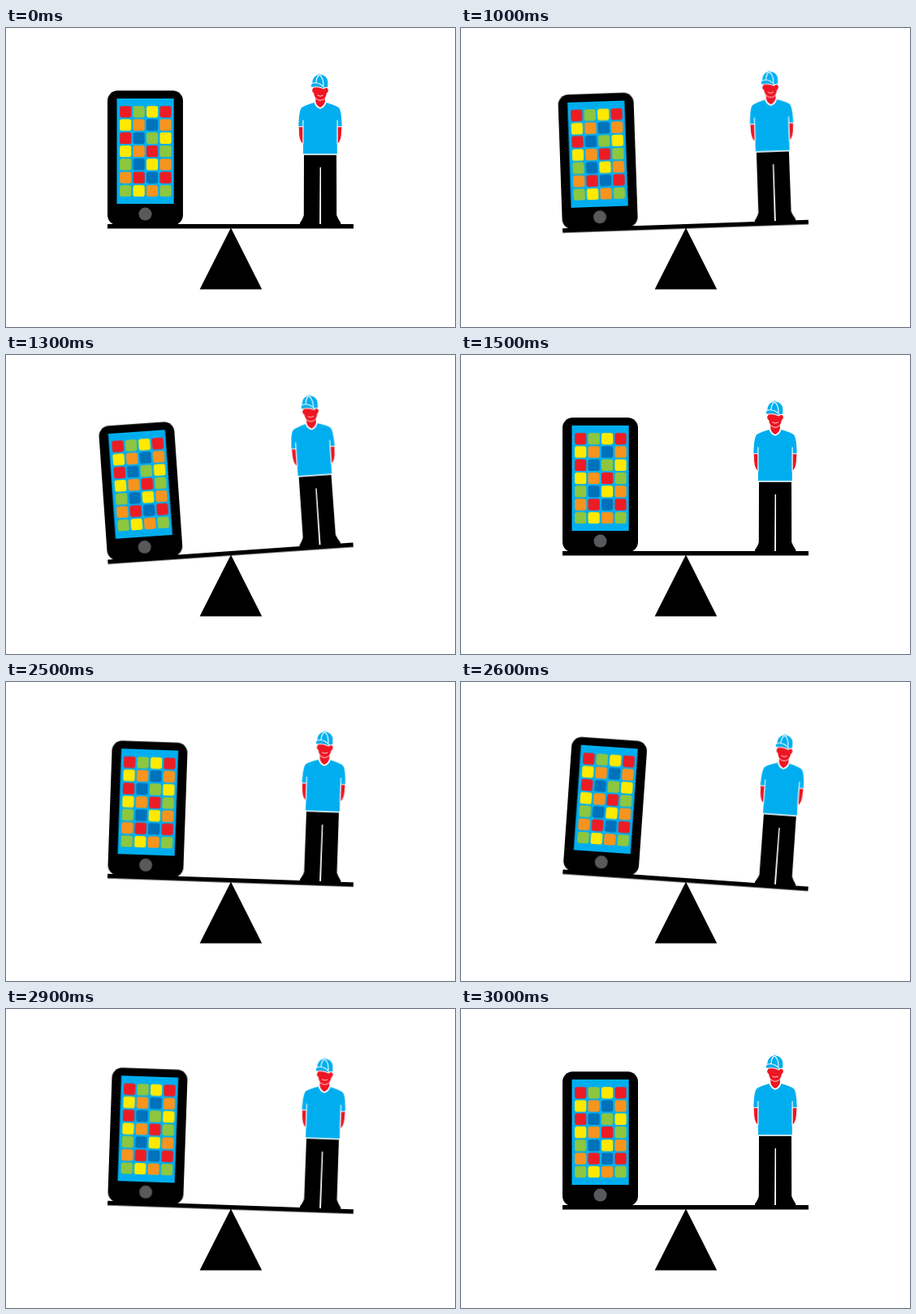
Animation, 553 px wide and 369 px high, one loop 3100 ms. Source, as an HTML page:

```html
<!DOCTYPE html>
<html lang="en">
<head>
<meta charset="utf-8">
<title>Balance</title>
<style>
  html, body { margin: 0; width: 100%; height: 100%; overflow: hidden; background: #fff; }
  svg { display: block; width: 100vw; height: 100vh; }
  #seesaw { transform-origin: 277px 244.3px; }
  .skin { fill: #ed1622; }
  .cloth { fill: #00aeef; }
  .seam { fill: none; stroke: #fff; stroke-width: 1.1; stroke-linecap: round; stroke-linejoin: round; }
  .bold { stroke-width: 1.7; }
  .fine { stroke-width: .8; }
</style>
</head>
<body>
<svg viewBox="0 0 553 369">
  <path d="M277 246.5L315.2 322.5H238.6Z"/>
  <g id="seesaw">
    <rect x="125" y="242" width="303" height="5.5"/>

    <g id="phone">
      <rect x="125" y="77.3" width="93" height="166" rx="12.5"/>
      <rect class="cloth" x="136.5" y="87" width="70.2" height="130"/>
      <circle cx="171.5" cy="229.6" r="8" fill="#58595b"/>
      <g id="tiles"></g>
    </g>

    <g id="man">
      <path d="M367 156H407L407.2 231Q408.5 235 412.3 240.5V243H388V172H386.6L386.1 243H362V240.5Q366 235 366.8 231Z"/>
      <path class="skin" d="M360.6 121H365.8V143Q362 140 361.2 132Z"/>
      <path class="skin" d="M413.4 121H408.2V143Q412 140 412.8 132Z"/>
      <path class="cloth" d="M380 92Q367 95.5 364 98.5Q360.8 102 360.3 122H366V156.2H407.8V122H413.7Q413.2 102 410 98.5Q407 95.5 394 92L387 99Z"/>
      <path class="skin" d="M381.3 84H392.9V92Q391 97 387 98.2Q383 97 381.3 92Z"/>
      <path class="seam bold" d="M380.2 91Q381.5 97 387 99Q392.5 97 393.9 91"/>
      <path class="skin" d="M378.4 69H395.6L395.8 75Q397.4 75.2 396.8 77.5Q396.2 80 395 80Q394 88 387 89.2Q380 88 379 80Q377.8 80 377.2 77.5Q376.6 75.2 378.2 75Z"/>
      <path class="seam fine" d="M383.8 83.2Q387 85.4 390.4 83.2M381.8 87.2Q387 91.8 392.4 87.2"/>
      <path class="seam" d="M365.9 114V143M408.1 114V143M360.3 121.8H365.8M408.2 121.8H413.7"/>
      <path class="seam bold" d="M366 156H408"/>
      <path class="cloth" d="M377.2 68Q377.5 59.5 384.6 57.7Q386 55.3 387.4 57.6Q395.5 59 396.3 66V73Q393 72.3 391.5 74.5Q384 70.8 376.3 73Q375.4 70.5 377.2 68Z"/>
      <path class="seam" d="M376.3 73.5Q384 71.3 391.5 75Q393 72.8 396.5 73.5M377.2 68.2Q386 66 392 73.5M385.6 58Q382 61.5 382 67M386.4 58Q391 62 391 71"/>
    </g>
  </g>
</svg>
<script>
  const colors = { R: '#ed1c24', G: '#8dc63f', Y: '#ffe900', O: '#f7941e', B: '#0072bc' };
  const rows = ['RGYR', 'YOBO', 'RBGY', 'YORG', 'GBYO', 'ORBR', 'GYOG'];
  const tiles = document.getElementById('tiles');

  rows.forEach((row, r) => [...row].forEach((key, c) => {
    const tile = document.createElementNS('http://www.w3.org/2000/svg', 'rect');
    const box = { x: 140.1 + c * 16.45, y: 96.2 + r * 16.28, width: 14.2, height: 14.2, rx: 2.8, fill: colors[key] };
    for (const name in box) tile.setAttribute(name, box[name]);
    tiles.append(tile);
  }));

  // Tilt in degrees, held from each time (ms) until the next.
  const loop = 3100;
  const steps = [
    [0, 0], [1000, -2], [1100, -4], [1200, -6], [1300, -4], [1400, -2],
    [1500, 0], [2500, 2], [2600, 4], [2700, 6], [2800, 4], [2900, 2], [3000, 0], [loop, 0]
  ];
  document.getElementById('seesaw').animate(
    steps.map(([time, tilt]) => ({ offset: time / loop, transform: `rotate(${tilt}deg)`, easing: 'step-end' })),
    { duration: loop, iterations: Infinity }
  );
</script>
</body>
</html>
```
